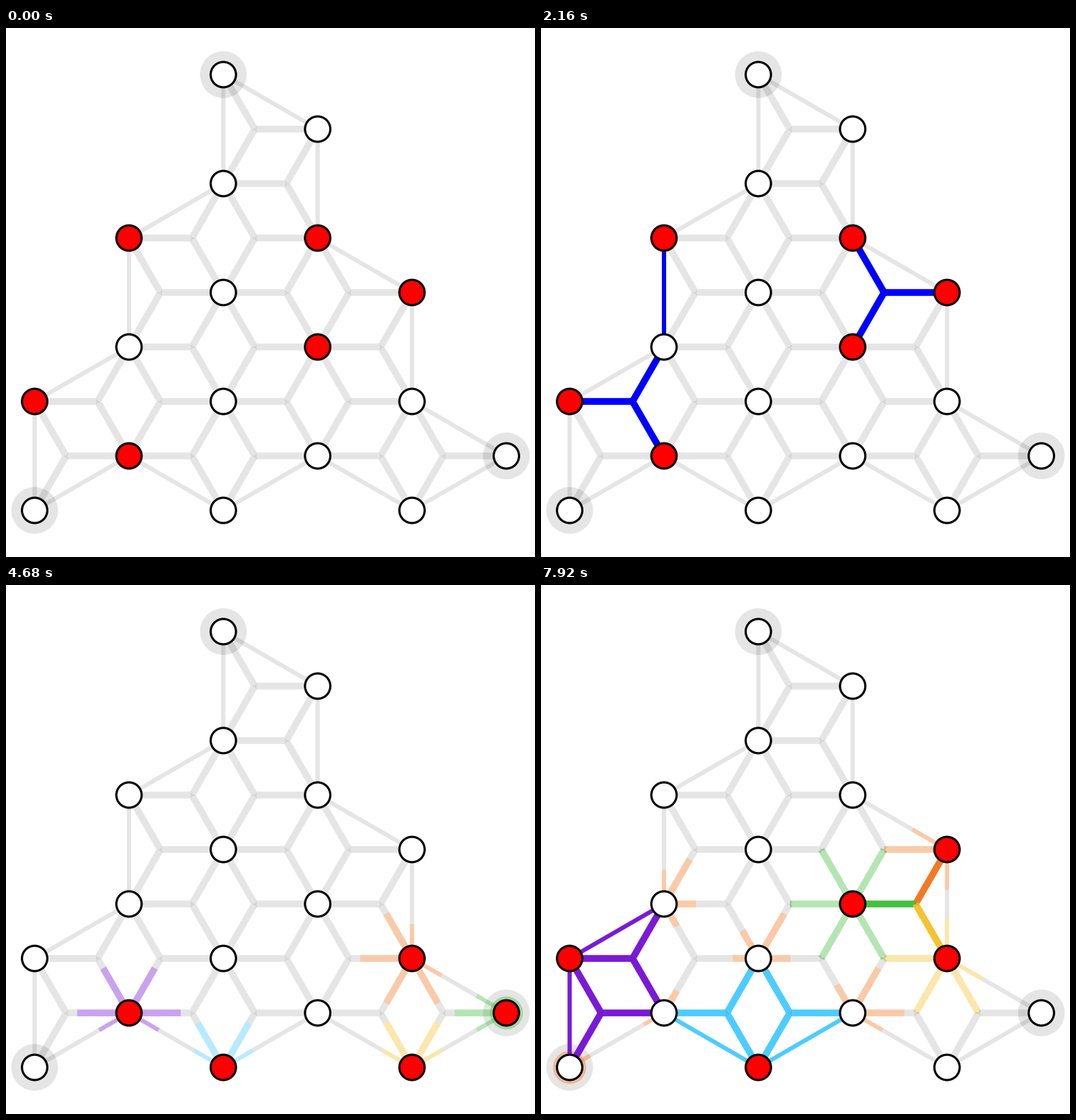
Animation of 748x748 px, one loop 8000 ms. Source, as a matplotlib script:

```python
import numpy as np
import matplotlib.pyplot as plt
from matplotlib.animation import FuncAnimation
from matplotlib.collections import PathCollection
from matplotlib.colors import to_rgba
from matplotlib.path import Path

SIZE, DPI = 748, 64
PT = 72 / DPI                     # points per pixel
FRAMES, INTERVAL, STEP = 200, 40, 90
STAGE = 6                         # steps in one growth stage

ORANGE, GREEN, YELLOW = "#F17B24", "#44C03F", "#F6C231"
CYAN, PURPLE, BROWN = "#4DCCFF", "#7A1AD6", "#8B4513"
GRAY = (0, 0, 0, 0.1)
BLUE, RED = "#0000FF", "#FF0000"

RIM = 18                          # edges start this far from a node centre
HALO_IN, HALO_OUT = 20, 33
WIDE, THIN = 9.6, 6.0

# column and row of every node on the slanted triangular grid
CELLS = "20 31 22 13 33 24 44 15 35 06 26 46 17 37 57 08 28 48".split()
NODES = {
    name: np.array([374 + 133.4 * (int(c) - 2.5), 374 + 77.02 * (int(r) - 4)])
    for name, (c, r) in zip("ABCDEFGHIJKLMNOPQR", CELLS)
}
CORNERS = "AOP"
EDGES = ("ABC BCE CDF CEF DFH EFI EGI FHK FIK GIL HJM HKM IKN ILN JMP KMQ KNQ "
         "LNR LOR AB AC BE CD DH EG GL HJ JP MP MQ NQ NR OR LO").split()
CENTRES = {e: sum(NODES[v] for v in e) / len(e) for e in EDGES}

# each round: first step, growing sets (nodes, colour, level after each stage),
# step at which the answer shows, answer edges
THIRD = 1 / 3
ROUNDS = [
    (0, [("E", ORANGE, [THIRD]), ("G", GREEN, [THIRD]), ("I", YELLOW, [THIRD]),
         ("D", CYAN, [THIRD, 0.5, 0.75]), ("J", PURPLE, [THIRD, 0.5]),
         ("M", BROWN, [THIRD, 0.5]), ("JMHP", ORANGE, [0, 0, 0.25])],
     24, ["EGI", "HJM", "DH"]),
    (30, [("I", ORANGE, [THIRD]), ("F", GREEN, [THIRD]), ("K", YELLOW, [THIRD])],
     42, ["FIK"]),
    (48, [("L", ORANGE, [THIRD]), ("O", GREEN, [THIRD]), ("R", YELLOW, [THIRD]),
          ("Q", CYAN, [THIRD, 0.5]), ("M", PURPLE, [THIRD, 0.5])],
     66, ["LOR", "MQ"]),
    (72, [("G", ORANGE, [THIRD]), ("I", GREEN, [THIRD]), ("L", YELLOW, [THIRD]),
          ("Q", CYAN, [THIRD, 1]), ("J", PURPLE, [THIRD, 1]),
          ("JHMPQKN", ORANGE, [0, 0, THIRD])],
     999, []),
]


def ease(t):
    return 2 * t * t if t < 0.5 else 1 - 2 * (1 - t) ** 2


def level(levels, step):
    stage, rest = divmod(step, STAGE)
    keys = [0] + levels
    a = keys[min(stage, len(levels))]
    b = keys[min(stage + 1, len(levels))]
    return a + (b - a) * ease(rest / STAGE)


class Edge:
    """Legs from a centre to each node; a set fills its own leg, then the others."""

    def __init__(self, name):
        self.name = name
        self.centre = CENTRES[name]
        self.length = np.hypot(*(NODES[name[0]] - self.centre)) - RIM
        self.free = {v: [0.0, self.length] for v in name}
        self.parts = {}

    def room(self, v):
        return self.free[v][1] - self.free[v][0]

    def mark(self, v, lo, hi, color):
        if hi - lo > 1e-6:
            self.parts.setdefault(color, []).append((v, lo, hi))

    def pour(self, v, amount, color):
        lo, hi = self.free[v]
        own = min(amount, hi - lo)
        self.mark(v, hi - own, hi, color)
        self.free[v][1] = hi - own
        rest = amount - own
        others = sorted((u for u in self.name if u != v), key=self.room)
        for i, u in enumerate(others):
            share = min(rest / (len(others) - i), self.room(u))
            start = self.free[u][0]
            self.mark(u, start, start + share, color)
            self.free[u][0] = start + share
            rest -= share

    def fill(self, nodes, amount, color):
        touched = [v for v in self.name if v in nodes]
        total = amount * self.length * len(self.name)
        for v in touched:
            self.pour(v, total / len(touched), color)

    def path(self, parts):
        points = []
        for v, lo, hi in parts:
            unit = NODES[v] - self.centre
            unit = unit / np.hypot(*unit)
            points += [self.centre + unit * lo, self.centre + unit * hi]
        return Path(points, [Path.MOVETO, Path.LINETO] * len(parts))

    def layers(self):
        """Yield (order, path, colour, width) for the rest and every fill."""
        width = WIDE if len(self.name) == 3 else THIN
        gaps = [(v, *self.free[v]) for v in self.name if self.room(v) > 1e-4]
        if gaps:
            yield 0, self.path(gaps), GRAY, width
        tight = not gaps
        for color, parts in self.parts.items():
            rgba = to_rgba(color, 1 if tight else 0.4)
            yield 1 + tight, self.path(parts), rgba, width


fig = plt.figure(figsize=(SIZE / DPI, SIZE / DPI), dpi=DPI, facecolor="white")
ax = fig.add_axes([0, 0, 1, 1])
ax.set_xlim(0, SIZE)
ax.set_ylim(SIZE, 0)
ax.axis("off")

halos = {}
for v in CORNERS:
    ax.add_patch(plt.Circle(NODES[v], HALO_OUT, fc=GRAY, ec="none", zorder=1))
    halos[v] = ax.add_patch(plt.Circle(NODES[v], HALO_IN, ec="none", zorder=2))

lines = PathCollection([], facecolors="none", capstyle="butt", zorder=3)
lines.set_snap(False)
ax.add_collection(lines, autolim=False)

# faint marks where three legs meet
for e, (x, y) in CENTRES.items():
    if len(e) == 3:
        right = sum(NODES[v][0] > x for v in e) == 1
        ax.plot(x, y, ls="", marker=(3, 2, 90 if right else -90), ms=7 * PT,
                mew=1.5 * PT, color="black", alpha=0.08, zorder=4)

dots = {v: ax.add_patch(plt.Circle(p, 17.9, fc="white", ec="black",
                                   lw=3.1 * PT, zorder=5))
        for v, p in NODES.items()}


def draw(frame):
    step = (frame * INTERVAL + 30) // STEP
    start, sets, answer_step, answer = [r for r in ROUNDS if r[0] <= step][-1]
    solved = step >= answer_step
    levels = [(nodes, color, level(keys, step - start))
              for nodes, color, keys in sets]

    layers = []
    for name in EDGES:
        edge = Edge(name)
        if solved:
            if name in answer:
                edge.fill(name, 1, BLUE)
        else:
            for nodes, color, amount in levels:
                if amount > 0 and set(nodes) & set(name):
                    edge.fill(nodes, amount, color)
        layers += edge.layers()
    layers.sort(key=lambda layer: layer[0])
    lines.set_paths([layer[1] for layer in layers])
    lines.set_edgecolor([layer[2] for layer in layers])
    lines.set_linewidth([layer[3] * PT for layer in layers])

    for v, halo in halos.items():
        halo.set_visible(False)
        for nodes, color, amount in levels:
            if v in nodes and amount > 0 and not solved:
                halo.set_visible(True)
                halo.set_radius(HALO_IN + (HALO_OUT - HALO_IN) * amount)
                halo.set_facecolor(to_rgba(color, 0.4))

    lit = {nodes for nodes, _, _ in sets if len(nodes) == 1}
    for v, dot in dots.items():
        dot.set_facecolor(RED if v in lit else "white")
    return []


anim = FuncAnimation(fig, draw, frames=FRAMES, interval=INTERVAL,
                     init_func=lambda: draw(0), repeat=True, repeat_delay=0)
plt.show()
```
